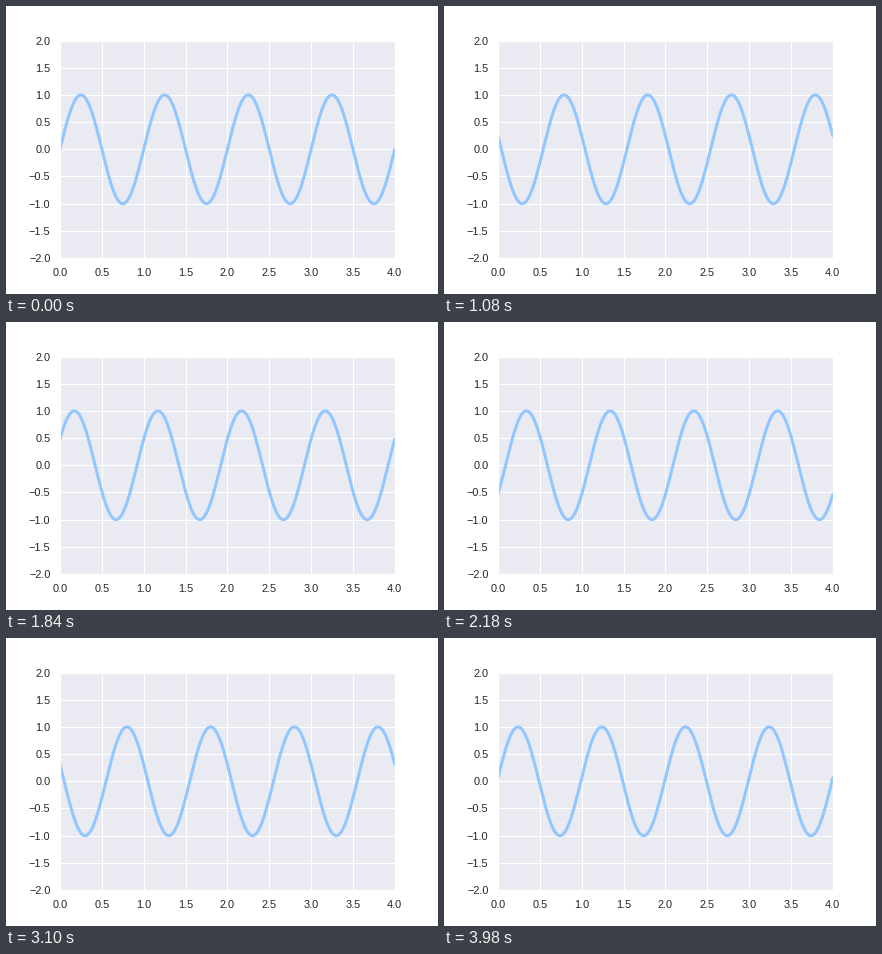
These frames come from a looping animation (432 by 288 pixels, 4000 ms). A matplotlib script:

```python
import numpy as np
import matplotlib.pyplot as plt
from matplotlib.animation import FuncAnimation

FRAMES = 200
INTERVAL = 20  # ms
INK = "0.15"

plt.rcParams.update({
    "font.family": "Liberation Sans",
    "axes.facecolor": "#EAEAF2",
    "axes.edgecolor": "white",
    "axes.linewidth": 1.25,
    "axes.axisbelow": True,
    "axes.grid": True,
    "grid.color": "white",
    "grid.linestyle": "-",
    "grid.linewidth": 1,
    "lines.solid_capstyle": "round",
    "toolbar": "None",
})
for axis, side in (("xtick", "bottom"), ("ytick", "left")):
    plt.rcParams.update({
        f"{axis}.{side}": False,
        f"{axis}.color": INK,
        f"{axis}.labelsize": 11,
        f"{axis}.major.size": 6,
        f"{axis}.major.pad": 3.5,
    })

fig = plt.figure(figsize=(6, 4), dpi=72, facecolor="white")
fig.subplots_adjust(left=0.125, right=0.9, bottom=0.125, top=0.88)
ax = fig.add_subplot(xlim=(0, 4), ylim=(-2, 2))
ax.set_xticks(np.arange(0, 4.1, 0.5))
ax.set_yticks(np.arange(-2, 2.1, 0.5))

x = np.linspace(0, 4, 1000)
wave, = ax.plot([], [], color="#92C6FF", lw=3)


def update(i):
    wave.set_data(x, np.sin(2 * np.pi * (x - 0.01 * i)))
    return wave,


anim = FuncAnimation(fig, update, frames=FRAMES, interval=INTERVAL,
                     repeat=True, repeat_delay=0, blit=False)
plt.show()
```
